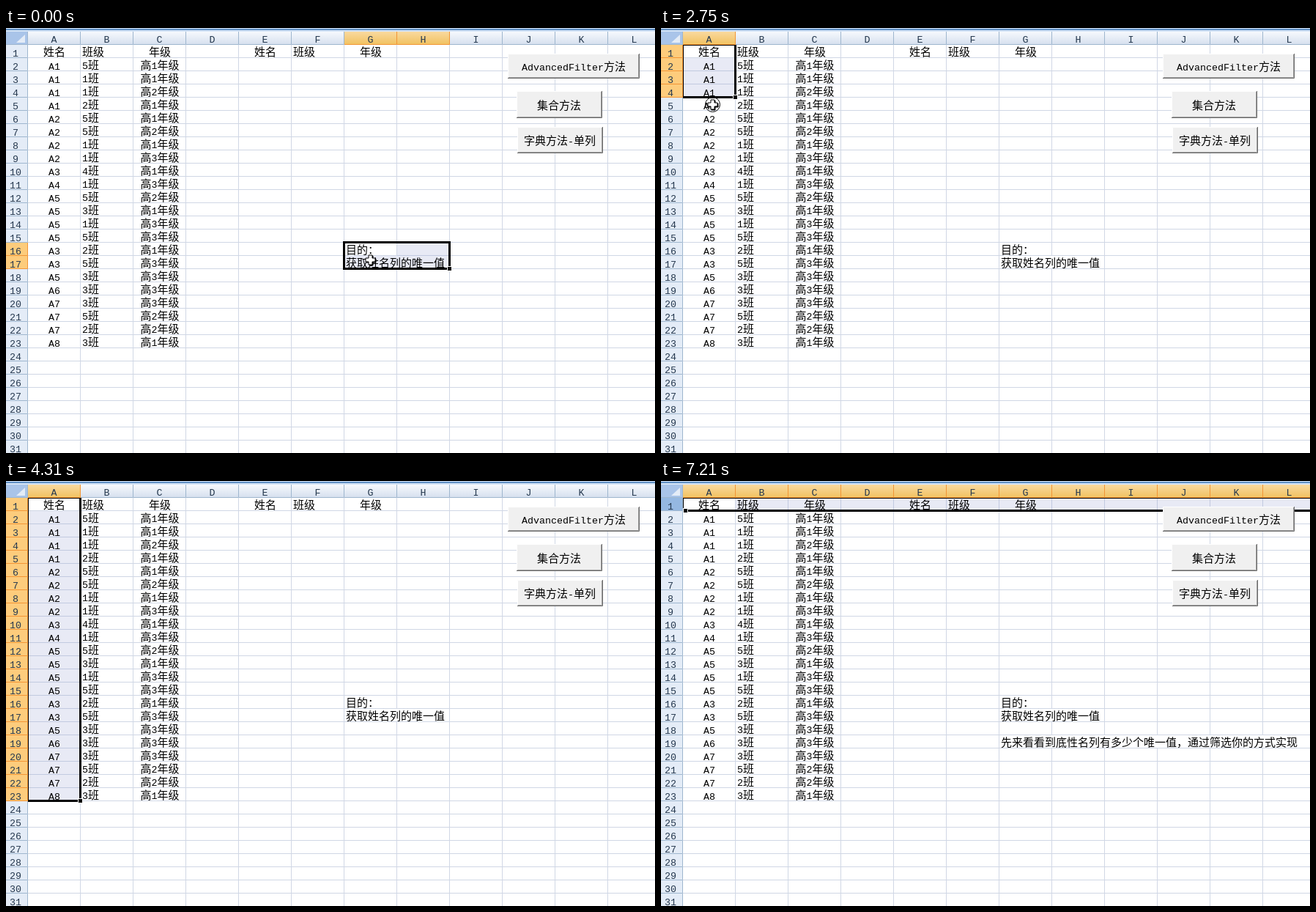
An HTML page for the animation above (8000 ms loop, 886 by 580 pixels).

```html
<!DOCTYPE html>
<html lang="zh-CN">
<head>
<meta charset="utf-8">
<style>
html, body { margin: 0; width: 100%; height: 100%; overflow: hidden; background: #fff; }
svg { display: block; }
text { white-space: pre; }
.zh { font: 15px "Noto Sans CJK SC", "Noto Sans CJK", sans-serif; font-weight: 300; }
.en { font: 13.33px "Liberation Mono", monospace; }
.col rect { fill: url(#colBg); }
.col path { stroke: #9eb6ce; }
.col.on rect { fill: url(#colOn); }
.col.on path { stroke: #f29536; }
.row rect { fill: #e4ecf7; }
.row path { stroke: #9eb6ce; }
.row.on rect { fill: #fdcc7c; }
.row.on path { stroke: #f29536; }
.row.full rect { fill: #95b8e2; }
.col text, .row text { fill: #26394f; }
</style>
</head>
<body>
<svg id="stage" width="886" height="580" viewBox="0 0 886 580">
  <defs>
    <linearGradient id="colBg" x2="0" y2="1"><stop stop-color="#f6f9fd"/><stop offset="1" stop-color="#d5dfee"/></linearGradient>
    <linearGradient id="colOn" x2="0" y2="1"><stop stop-color="#f9d99f"/><stop offset="1" stop-color="#f1c15f"/></linearGradient>
  </defs>
</svg>
<script>
const NS = 'http://www.w3.org/2000/svg';
const LOOP = 8000, W = 72, H = 18, COLS = 12, ROWS = 31;
const stage = document.getElementById('stage');
const colX = c => 30 + W * c;
const rowY = r => 23 + H * (r - 1);

function put(el, attrs) {
  for (const k in attrs) el.setAttribute(k, attrs[k]);
  return el;
}
const add = (parent, tag, attrs = {}) =>
  parent.appendChild(put(document.createElementNS(NS, tag), attrs));
const group = (cls = '') => add(stage, 'g', { class: cls });
const rect = (p, x, y, width, height, fill = 'none') => add(p, 'rect', { x, y, width, height, fill });
const line = (p, d, stroke = 'none') => add(p, 'path', { d, stroke, fill: 'none' });
const show = (el, on) => el.setAttribute('visibility', on ? 'visible' : 'hidden');

// Latin and Chinese runs use different fonts at different sizes.
function label(p, x, y, str, anchor = 'middle') {
  const el = add(p, 'text', { x, y, 'text-anchor': anchor });
  for (const run of str.match(/[ -~]+|[^ -~]+/g))
    add(el, 'tspan', { class: run[0] <= '~' ? 'en' : 'zh' }).textContent = run;
  return el;
}
const centered = (p, c, r, str) => label(p, colX(c) + 36, rowY(r) + 15, str);
const leftCell = (p, c, r, str) => label(p, colX(c) + 2, rowY(r) + 15, str, 'start');

// Grid
const grid = group();
for (let c = 1; c < COLS; c++) line(grid, `M${colX(c) - .5} 23V580`, '#d0d7e5');
for (let r = 1; r <= ROWS; r++) line(grid, `M30 ${rowY(r + 1) - .5}H886`, '#d0d7e5');
rect(grid, 533, rowY(17), 1, 17, '#fff');
const noteBg = rect(grid, 533, rowY(19), 353, 17, '#fff');

const shade = add(stage, 'path', { fill: '#8391c8', 'fill-opacity': .19, 'fill-rule': 'evenodd' });

// Cells
const cells = group();
for (const c of [0, 4]) {
  centered(cells, c, 1, '姓名');
  leftCell(cells, c + 1, 1, '班级');
  centered(cells, c + 2, 1, '年级');
}
'151 111 112 121 251 252 211 213 341 413 552 531 513 553 321 353 533 633 733 752 722 831'
  .split(' ').forEach(([name, room, grade], i) => {
    label(cells, 66, rowY(i + 2) + 16, 'A' + name);
    leftCell(cells, 1, i + 2, room + '班');
    centered(cells, 2, i + 2, `高${grade}年级`);
  });
leftCell(cells, 6, 16, '目的：');
leftCell(cells, 6, 17, '获取姓名列的唯一值');
const note = leftCell(cells, 6, 19, '先来看看到底性名列有多少个唯一值，通过筛选你的方式实现');

// Selection frame
const frame = add(stage, 'rect', { fill: 'none', stroke: '#000', 'stroke-width': 3 });
const handle = add(stage, 'rect', { width: 6, height: 6, stroke: '#fff' });

// Buttons
function button(x, y, w, h, str, tx, ty) {
  const g = group();
  rect(g, x, y, w, h, '#f0f0f0');
  line(g, `M${x + .5} ${y + h}V${y + .5}H${x + w}`, '#fff');
  line(g, `M${x + 1} ${y + h - 1.5}H${x + w - 1.5}V${y + 1}`, '#a0a0a0');
  line(g, `M${x} ${y + h - .5}H${x + w - .5}V${y}`, '#696969');
  label(g, tx, ty, str);
}
button(685, 35, 180, 34, 'AdvancedFilter方法', 775, 58);
button(697, 86, 117, 37, '集合方法', 755, 111);
button(698, 135, 117, 36, '字典方法-单列', 756, 159);

// Headers
const strip = group();
rect(strip, 0, 0, 886, 5, '#d3e3f6');
rect(strip, 0, 1, 886, 2, '#5f8fc4');
const colHeads = [], rowHeads = [];
for (let c = 0; c < COLS; c++) {
  const g = group('col'), x = colX(c);
  rect(g, x, 5, W, 18);
  line(g, `M${x} 22.5h${W - .5}V5`);
  label(g, x + 35.5, 20, String.fromCharCode(65 + c));
  colHeads.push(g);
}
for (let r = 1; r <= ROWS; r++) {
  const g = group('row'), y = rowY(r);
  rect(g, 0, y, 30, H);
  line(g, `M0 ${y + 17.5}H29.5V${y}`);
  label(g, 13, y + 16, String(r));
  rowHeads.push(g);
}
const corner = group();
rect(corner, 0, 5, 30, 18, '#a9c4e9');
line(corner, 'M0 22.5H29.5V5', '#9eb6ce');
add(corner, 'path', { d: 'M26 9V20H14Z', fill: '#e4ecf7' });

// Pointers, each drawn around its hot spot
const pointer = group();
const PLUS = 'M-2.5-6.5h5v4h4v5h-4v4h-5v-4h-4v-5h4z';
const RESIZE = 'M-7-1H-1V-4H-4L0-8 4-4H1V-1H8V1H1V4H4L0 8-4 4H-1V1H-7Z';
const ARROW = 'M-7-1.5H1V-5L7 0 1 5V1.5H-7Z';
const shapes = { '+': add(pointer, 'g'), r: add(pointer, 'g'), a: add(pointer, 'g') };
add(shapes['+'], 'path', { d: PLUS, transform: 'translate(1 1)', stroke: '#000' });
add(shapes['+'], 'path', { d: PLUS, fill: '#fff', stroke: '#000' });
for (const [k, d] of [['r', RESIZE], ['a', ARROW]])
  add(shapes[k], 'path', { d, stroke: '#fff', 'paint-order': 'stroke' });
const ring = add(pointer, 'circle', { r: 10, fill: 'none', stroke: '#000' });

// Screen refreshes: start, interval, count
const ticks = [
  [0, 0, 1], [120, 150, 3], [540, 0, 1], [820, 150, 3], [1240, 0, 1], [1520, 150, 5],
  [2240, 120, 4], [2720, 150, 5], [3720, 0, 1], [4160, 150, 2], [5010, 150, 5],
  [5730, 120, 3], [6120, 250, 2], [6520, 150, 3], [6940, 120, 2], [7210, 0, 1]
].flatMap(([t, gap, n]) => Array.from({ length: n }, (_, i) => t + gap * i));

// Pointer path: time, x, y, shape ("o" adds the click ring)
const path = [
  [0, 497, 316, '+'], [120, 490, 308, '+'], [270, 482, 302, '+o'], [540, 482, 320, '+o'],
  [820, 500, 320, '+o'], [1240, 588, 319, '+o'], [1520, 578, 327, '+'], [1970, 528, 350, '+o'],
  [2120, 500, 325, '+'], [2480, 72, 36, '+'], [2600, 70, 34, '+o'], [3020, 71, 278, '+o'],
  [3320, 60, 415, '+o'], [3720, 57, 423, '+o'], [4160, 57, 423, '+'], [4310, 57, 423, ''],
  [5010, 694, 354, '+'], [5970, 70, 64, '+'], [6120, 20, 43, 'r'], [6370, 20, 33, 'a'],
  [6520, 20, 32, 'ao'], [6820, 20, 32, 'a'], [7060, 34, 32, '+'], [7210, 34, 32, '']
];

// Selections: time, first column, first row, last column, last row
const picks = [
  [0, 6, 16, 7, 17], [270, 6, 16, 6, 16], [540, 6, 16, 6, 17], [970, 6, 16, 7, 17],
  [1970, 6, 19, 6, 19], [2600, 0, 1, 0, 1], [3720, 0, 1, 0, 23],
  [5010, 6, 19, 13, 19], [6520, 0, 1, 13, 1]
];

const lastAt = (list, t) => list.findLastIndex(k => k[0] <= t);

function drawPointer(t) {
  const i = lastAt(path, t), a = path[i], b = path[i + 1] || a;
  const k = b === a ? 0 : (t - a[0]) / (b[0] - a[0]);
  const [x, y] = [1, 2].map(j => Math.round(a[j] + (b[j] - a[j]) * k) + .5);
  pointer.setAttribute('transform', `translate(${x} ${y})`);
  for (const s in shapes) show(shapes[s], a[3][0] === s);
  show(ring, a[3].endsWith('o'));
}

function drawSelection(t) {
  let [, c0, r0, c1, r1] = picks[lastAt(picks, t)];
  // Dragging down the first column
  if (t >= 2600 && t < 3720)
    r1 = Math.round(t < 3020 ? 1 + 12 * (t - 2600) / 420 : 13 + 9 * (t - 3020) / 300);
  const x = colX(c0), y = rowY(r0), w = W * (c1 - c0 + 1), h = H * (r1 - r0 + 1);
  const full = c0 === 0 && c1 >= COLS;
  put(shade, { d: `M${x} ${y}h${w}v${h}h${-w}zM${x} ${y}h${W}v${H}h${-W}z` });
  put(frame, { x: x - .5, y: y - .5, width: w, height: h });
  put(handle, { x: full ? 30.5 : x + w - 3.5, y: y + h - 3.5 });
  colHeads.forEach((g, c) => g.classList.toggle('on', c >= c0 && c <= c1));
  rowHeads.forEach((g, i) => {
    const on = i + 1 >= r0 && i + 1 <= r1;
    g.classList.toggle('on', on && !full);
    g.classList.toggle('full', on && full);
  });
}

let shown = -1;
function render() {
  const time = performance.now() % LOOP;
  const t = ticks.findLast(k => k <= time);
  if (t !== shown) {
    shown = t;
    drawSelection(t);
    drawPointer(t);
    show(note, t >= 5010);
    show(noteBg, t >= 5010);
  }
  requestAnimationFrame(render);
}
render();
</script>
</body>
</html>
```
